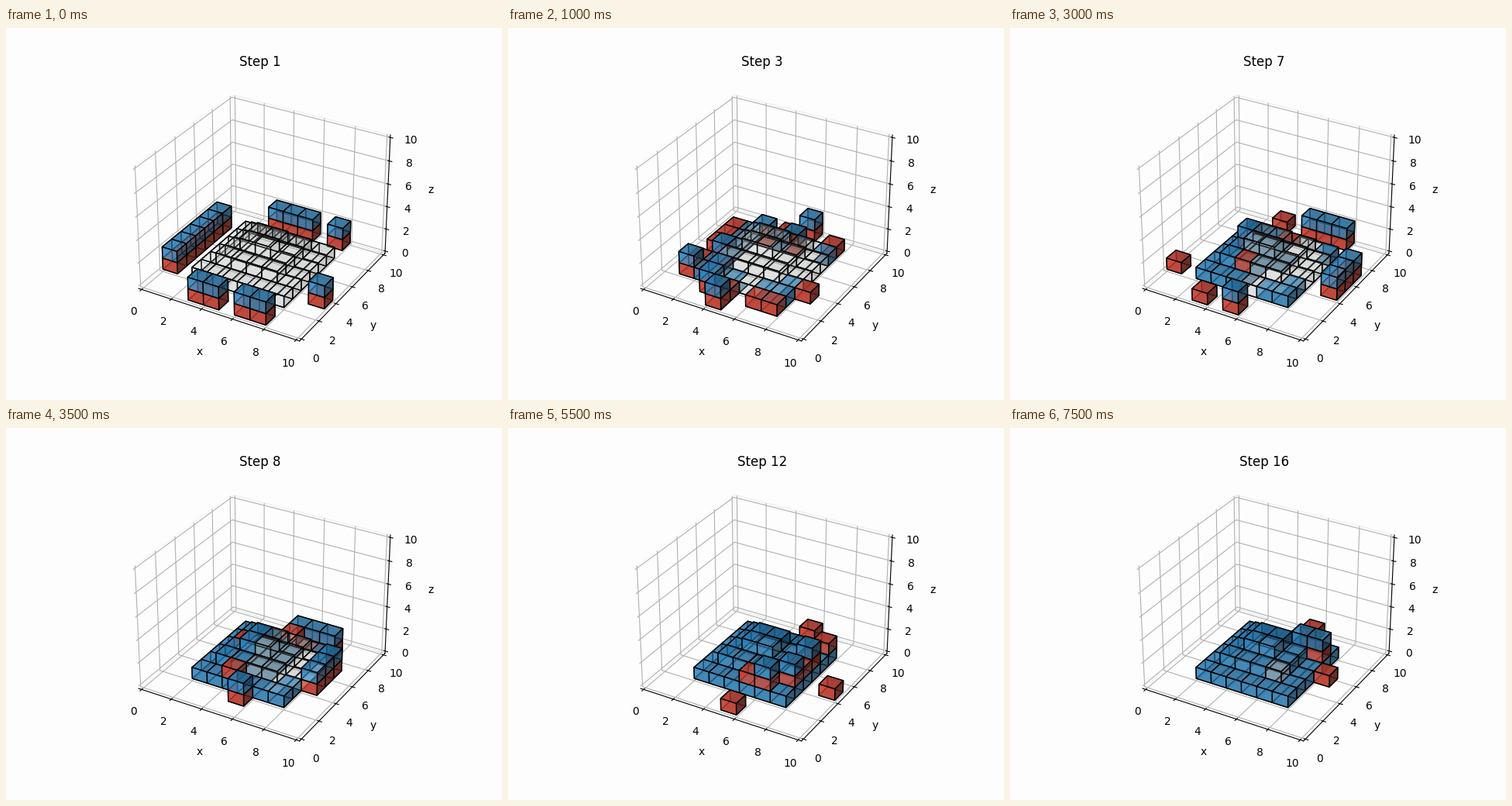
These frames come from a looping animation (640 by 480 pixels, 8000 ms). A matplotlib script:

```python
import numpy as np
import matplotlib.pyplot as plt
from matplotlib.animation import FuncAnimation

STEPS = 16
SIZE = 10
LAYERS = 3
MARGIN = SIZE / 48
BG = "#fdfdfd"
ROBOT, BRICK, PLAN = "#e74c3cbf", "#3498dba6", "#ecf0f133"
GAP = (6, 3, 1)  # the one brick that is still missing at the end

trips = []


def send(start, side, lanes, depth):
    """Robots enter along lanes, drop a brick ahead at depth and walk back."""
    trips.extend((start, side, lane, depth) for lane in lanes)


send(1, "left", [2, 3, 5, 6, 7], 1)
send(1, "left", [4], 2)
send(1, "front", [4, 6, 7], 1)
send(1, "front", [3], 2)
send(1, "right", [3], 1)
send(1, "back", [4, 7], 1)
send(1, "back", [3, 5], 2)
send(2, "left", [2], 2)
send(2, "front", [3], 2)
send(3, "front", [4], 3)
send(3, "back", [5], 3)
send(4, "left", [5], 3)
send(4, "front", [3], 1)
send(4, "back", [3], 1)
send(7, "front", [5], 2)
send(7, "right", [4], 2)
send(7, "right", [5, 6], 1)
send(7, "back", [5, 6], 1)
send(7, "back", [7], 3)
send(9, "front", [5], 2)
send(9, "right", [4], 2)
send(9, "back", [5], 1)
send(10, "front", [6], 2)
send(10, "right", [3], 2)
send(10, "right", [5], 3)
send(13, "right", [6], 3)
send(13, "back", [5], 1)
send(14, "right", [6], 3)


def cell(side, lane, d):
    far = SIZE - 1 - d
    return {"left": (d, lane), "right": (far, lane),
            "front": (lane, d), "back": (lane, far)}[side]


def plan():
    """Step at which each brick of the pyramid is laid, inf outside it."""
    laid = np.full((SIZE,) * 3, np.inf)
    x = np.arange(SIZE)[:, None]
    for z in range(LAYERS):
        inside = slice(2 + z, SIZE - 2 - z)
        laid[inside, inside, z] = 3 + 1.5 * (x[inside] - 2) + z
    for start, side, lane, depth in trips:
        spot = (*cell(side, lane, depth + 1), 0)
        if np.isfinite(laid[spot]):
            laid[spot] = min(laid[spot], start + depth + 1)
    laid[GAP] = STEPS + 1
    return laid


LAID = plan()


def paint(step):
    """Colour of every occupied cell at a step, '' where empty."""
    color = np.full(LAID.shape, "", dtype=object)
    color[np.isfinite(LAID)] = PLAN
    color[LAID <= step] = BRICK
    robots, loads = [], []
    for start, side, lane, depth in trips:
        age = step - start
        if not 0 <= age <= 2 * depth + 1:
            continue
        x, y = cell(side, lane, min(age, 2 * depth + 1 - age))
        z = int(LAID[x, y, 0] < step)
        robots.append((x, y, z))
        if age <= depth:
            loads.append((x, y, z + 1))
    for spot in loads:
        color[spot] = BRICK
    for spot in robots:
        color[spot] = ROBOT
    return color


fig = plt.figure(figsize=(6.4, 4.8), dpi=100, facecolor=BG)
ax = fig.add_subplot(projection="3d", facecolor=BG)
span = (-MARGIN, SIZE + MARGIN)
ax.set(xlim=span, ylim=span, zlim=span, xlabel="x", ylabel="y", zlabel="z")
for axis in (ax.xaxis, ax.yaxis, ax.zaxis):
    axis.set_ticks(range(0, SIZE + 1, 2))
    axis.pane.fill = False

drawn = []


def update(i):
    while drawn:
        drawn.pop().remove()
    color = paint(i + 1)
    blocks = ax.voxels(color != "", facecolors=color, edgecolors="k")
    drawn.extend(blocks.values())
    ax.set_title(f"Step {i + 1}")
    return drawn


anim = FuncAnimation(fig, update, frames=STEPS, interval=500,
                     init_func=lambda: [], repeat=True, repeat_delay=0)
plt.show()
```
